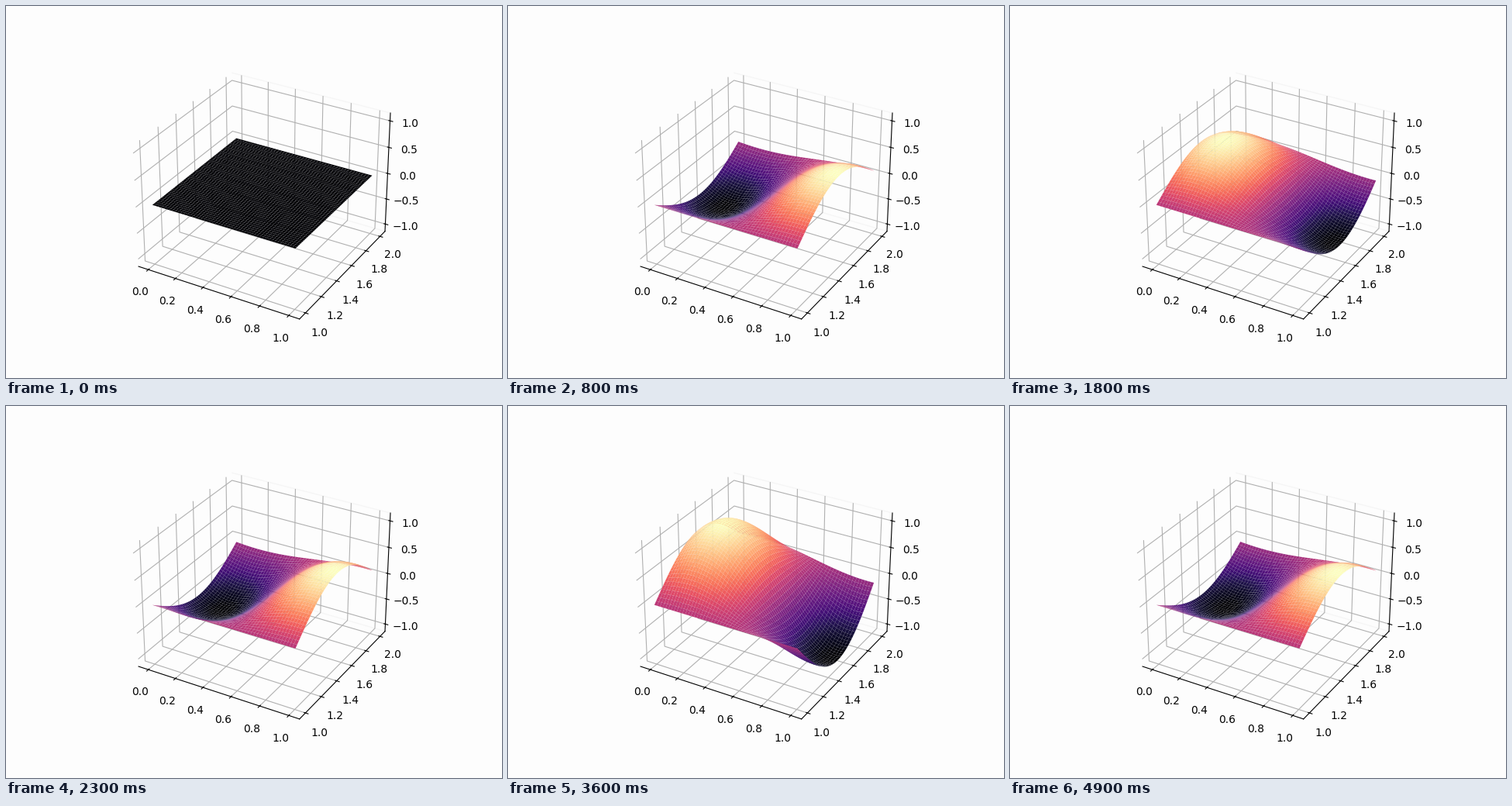
Write a matplotlib script that moves like this. It is 640 by 480 pixels and loops after 5 s.

```python
import numpy as np
import matplotlib.pyplot as plt
from matplotlib.animation import FuncAnimation

FRAMES = 50
BACKGROUND = "#fdfdfd"
PANE_EDGE = "#efefef"
MARGIN = 0.55 * 25 / 24  # half-width of a unit range with its padding

x, y = np.meshgrid(np.linspace(0, 1, 50), np.linspace(1, 2, 50))
mode = np.sin(4 * (x + 1)) * np.sin(3 * (y - 1))
times = np.linspace(0, 3, FRAMES)

fig = plt.figure(figsize=(6.4, 4.8), dpi=100, facecolor=BACKGROUND)
ax = fig.add_subplot(projection="3d", facecolor=BACKGROUND)
ax.set_xlim(0.5 - MARGIN, 0.5 + MARGIN, view_margin=0)
ax.set_ylim(1.5 - MARGIN, 1.5 + MARGIN, view_margin=0)
ax.set_zlim(-2 * MARGIN, 2 * MARGIN, view_margin=0)
ax.set_xticks(np.linspace(0, 1, 6))
ax.set_yticks(np.linspace(1, 2, 6))
ax.set_zticks(np.linspace(-1, 1, 5))
ax.set_autoscale_on(False)

for axis in (ax.xaxis, ax.yaxis, ax.zaxis):
    axis.pane.set_facecolor("none")
    axis.pane.set_edgecolor("none")
ax.yaxis.pane.set_edgecolor(PANE_EDGE)

surfaces = []


def update(frame):
    while surfaces:
        surfaces.pop().remove()
    z = mode * np.sin(5 * times[frame])
    surfaces.append(ax.plot_surface(x, y, z, cmap="magma"))
    return surfaces


anim = FuncAnimation(fig, update, frames=FRAMES, interval=100,
                     repeat=True, repeat_delay=0, blit=False)
plt.show()
```
